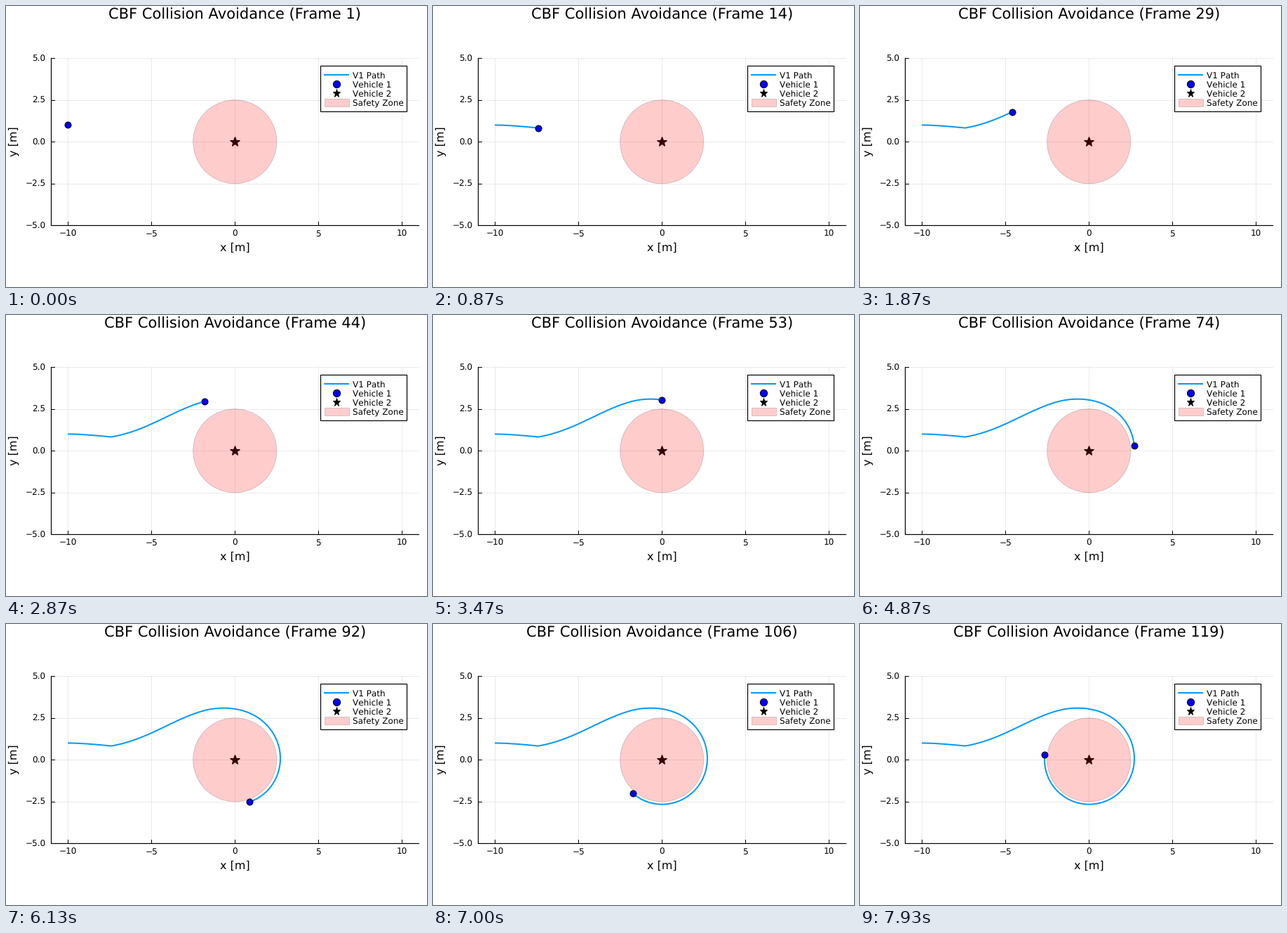
A matplotlib script that plays this animation: 600 by 400 pixels, repeating every 8000 ms.

```python
import numpy as np
import matplotlib.pyplot as plt
from matplotlib.animation import FuncAnimation
from matplotlib.patches import Circle, Rectangle

plt.rcParams["font.family"] = "DejaVu Sans"
plt.rcParams["text.hinting"] = "none"
plt.rcParams["text.hinting_factor"] = 1

FRAMES, LOOP_MS = 120, 8000
PX = 0.72                      # points per pixel at 100 dpi
X0, Y0, UNIT = 326.2, 193.3, 23.82
LEFT, RIGHT, TOP, BOTTOM = 64.3, 588.2, 74.2, 312.4
BLUE = "#009afa"


def sx(x):
    return X0 + UNIT * np.asarray(x)


def sy(y):
    return Y0 - UNIT * np.asarray(y)


def even_steps(x, y, steps):
    """Resample a dense curve into equal steps of arc length."""
    s = np.r_[0, np.cumsum(np.hypot(np.diff(x), np.diff(y)))]
    at = np.linspace(0, s[-1], steps + 1)
    return np.interp(at, s, x), np.interp(at, s, y)


def approach():
    s = np.linspace(0, 2.6, 400)
    tau = 1.15
    return -10 + s, 1 - 0.11 * (s - tau * (1 - np.exp(-s / tau)))


def orbit():
    # Clockwise spiral that settles on a ring just outside the zone
    u = np.linspace(31.5, -281.1, 3000)
    r = 2.65 + 0.39 * np.exp(u * (0.0214 + 0.002 * np.tanh(u / 20)))
    phi = np.radians(90 + u)
    return r * np.cos(phi), r * np.sin(phi)


def swerve(start, end):
    t = np.linspace(0, 1, 600)[:, None]
    a, d = np.array(start), np.array(end)
    b, c = a + (2.2, 0.37), d - (1.89, 0.51)
    p = (1 - t)**3 * a + 3 * t * (1 - t)**2 * b + 3 * t**2 * (1 - t) * c + t**3 * d
    return p[:, 0], p[:, 1]


def build_path():
    first, last = approach(), orbit()
    mid = swerve((first[0][-1], first[1][-1]), (last[0][0], last[1][0]))
    parts = [even_steps(*first, 13), even_steps(*mid, 30), even_steps(*last, 76)]
    xs = np.concatenate([parts[0][0]] + [p[0][1:] for p in parts[1:]])
    ys = np.concatenate([parts[0][1]] + [p[1][1:] for p in parts[1:]])
    return sx(xs), sy(ys)


fig = plt.figure(figsize=(6, 4), dpi=100, facecolor="white")
ax = fig.add_axes([0, 0, 1, 1])
ax.set_xlim(0, 600)
ax.set_ylim(400, 0)
ax.axis("off")


def seg(xs, ys, color="black", width=1.0, z=1, **kw):
    return ax.plot(xs, ys, color=color, lw=width * PX, zorder=z, **kw)[0]


def label(x, y, text, size, ha="center", **kw):
    return ax.text(x, y, text, fontsize=size * PX, ha=ha, va="baseline",
                   zorder=12, **kw)


def dot(x, y, shape, color, size, z):
    return ax.plot([x], [y], shape, color=color, ms=size * PX, mec="black",
                   mew=1 * PX, zorder=z)[0]


def number(v, digits):
    return f"{v:.{digits}f}".replace("-", "\u2212")


# Grid, ticks and axes
for v in (-10, -5, 0, 5, 10):
    x = sx(v)
    seg([x, x], [TOP, BOTTOM], width=0.8, alpha=0.1)
    seg([x, x], [BOTTOM, BOTTOM - 5], z=2)
    label(x, 328.2, number(v, 0), 11.8)
for v in (-5, -2.5, 0, 2.5, 5):
    y = sy(v)
    seg([LEFT, RIGHT], [y, y], width=0.8, alpha=0.1)
    seg([LEFT, LEFT + 5], [y, y], z=2)
    label(56.6, y + 4.3, number(v, 1), 11.8, ha="right")
seg([LEFT, LEFT, RIGHT], [TOP, BOTTOM, BOTTOM], width=1.2, z=2)

label(326.5, 348.6, "x [m]", 16.2)
label(16, 192.8, "y [m]", 16.2, rotation=90, rotation_mode="anchor")
title = label(326.4, 18.2, "", 20.7)

# Scene
path = seg([], [], BLUE, 2, z=4, solid_capstyle="butt", solid_joinstyle="round")
car = dot(0, 0, "o", "#0000ff", 9, 5)
dot(X0, Y0, "*", "black", 14.5, 6)
ax.add_patch(Circle((X0, Y0), 2.5 * UNIT, fc=(1, 0, 0, 0.2),
                    ec=(0, 0, 0, 0.2), lw=0.8 * PX, zorder=7))

# Legend
ax.add_patch(Rectangle((447.8, 85), 122.8, 65, fc="white", ec="black",
                       lw=1.2 * PX, zorder=9))
seg([453.2, 489.2], [98, 98], BLUE, 2, z=10, solid_capstyle="butt")
dot(471.2, 111, "o", "#0000ff", 10.3, 10)
dot(471.2, 124.2, "*", "black", 11.5, 10)
ax.add_patch(Rectangle((453.5, 131.6), 35.4, 11, fc=(1, 0, 0, 0.2),
                       ec=(0, 0, 0, 0.2), lw=0.8 * PX, zorder=10))
for i, name in enumerate(("V1 Path", "Vehicle 1", "Vehicle 2", "Safety Zone")):
    label(493.8, 102.4 + 13 * i, name, 11.8, ha="left")

px, py = build_path()


def draw(k):
    path.set_data(px[:k + 1], py[:k + 1])
    car.set_data([px[k]], [py[k]])
    title.set_text(f"CBF Collision Avoidance (Frame {k + 1})")
    return path, car, title


anim = FuncAnimation(fig, draw, frames=FRAMES, interval=LOOP_MS / FRAMES,
                     repeat=True, repeat_delay=0, blit=False)
plt.show()
```
